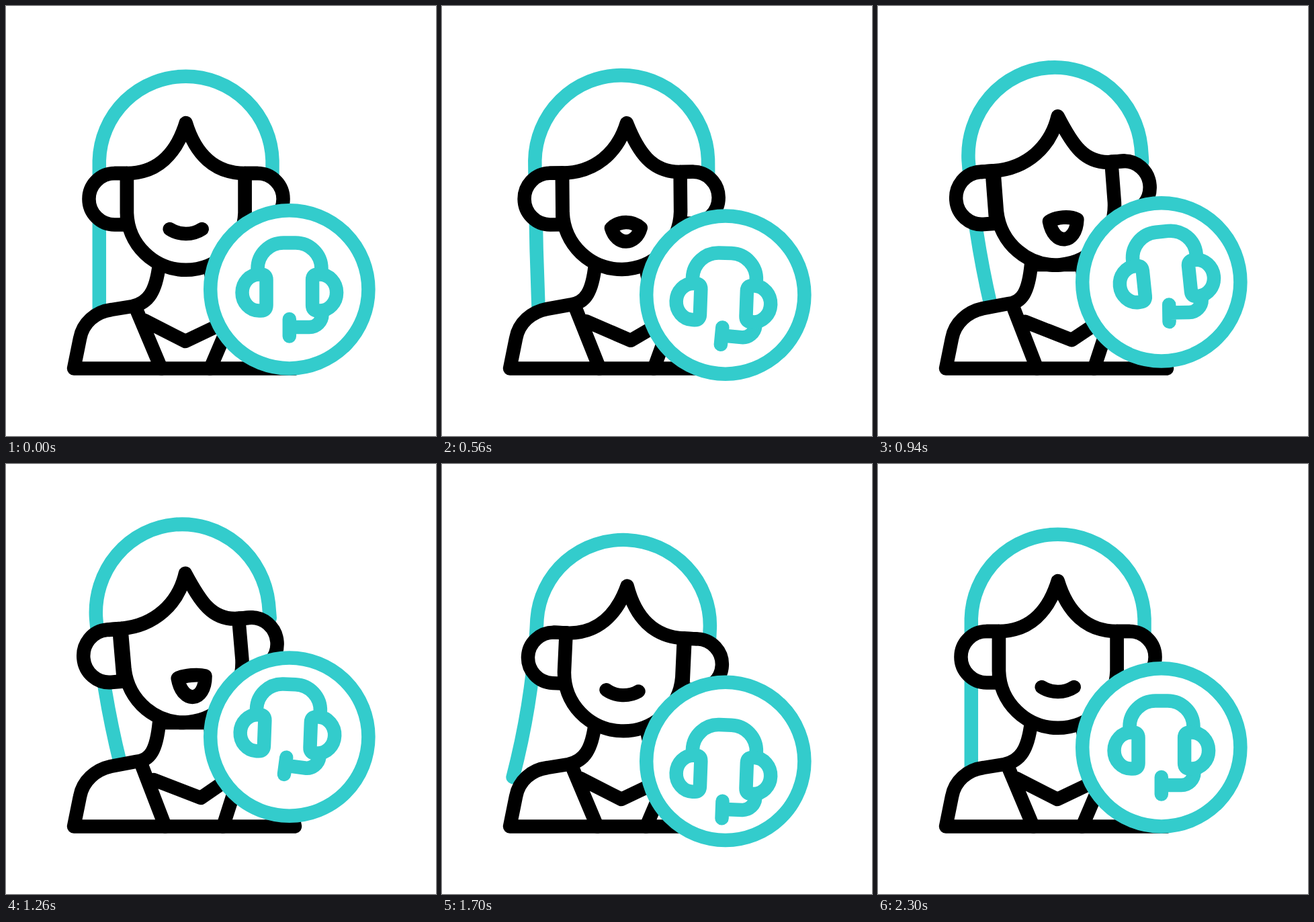
Recreate the animation shown at these times as an HTML page. Size 640 px wide and 640 px high, loop 2720 ms.

```html
<!DOCTYPE html>
<html lang="en">
<head>
<meta charset="utf-8">
<title>Support agent</title>
<style>
html, body { margin: 0; height: 100%; overflow: hidden; background: #fff }
svg { display: block; width: 100vw; height: 100vh }
g { stroke-width: 20.5; stroke-linecap: round; stroke-linejoin: round; fill: none; stroke: #000 }
.teal { stroke: #3cc }
.solid { fill: #fff }
</style>
</head>
<body>
<svg viewBox="0 0 640 640">
  <g id="hairTurn" class="teal"><path id="hair"/></g>
  <g>
    <path id="body" class="solid"/>
    <path id="shirt"/>
  </g>
  <g id="ears">
    <path class="solid" d="M180 325.5H161.7a38.2 38.2 0 0 1 0-76.5H180zM355.5 325.5h18.8a38.2 38.2 0 0 0 0-76.5H355.5z"/>
  </g>
  <g id="face">
    <path class="solid" d="M180 249V308a87.8 87.8 0 0 0 175.5 0V249"/>
    <path id="bangs" class="solid"/>
    <path id="mouth"/>
  </g>
  <g id="badge" class="teal"><circle class="solid" cx="421.8" cy="421.8" r="117.6"/></g>
  <g id="headset" class="teal">
    <path d="M374.5 397v-6a38.5 38.5 0 0 1 38.5-38.5h18a38.5 38.5 0 0 1 38.5 38.5v6"/>
    <path id="mic" d="M470.5 459a19 19 0 0 1-19 19H421.8M421.8 466v25.5"/>
    <path id="cup" class="solid" d="M376.5 399.5a25 27 0 0 0 0 54h3q8 0 8-8v-38q0-8-8-8z"/>
    <use href="#cup" transform="matrix(-1 0 0 1 843.6 0)"/>
  </g>
</svg>
<script>
const LOOP = 2720, STEP = 20;
const START = 200, DIP = 400, PEAK = 1270, DIP2 = 1650, REBOUND = 1930, END = 2300;

const set = (id, name, value) => document.getElementById(id).setAttribute(name, value);
const part = (t, from, to) => Math.min(1, Math.max(0, (t - from) / (to - from)));
const smooth = u => (1 - Math.cos(Math.PI * u)) / 2;
const easeOut = (u, power) => 1 - (1 - u) ** power;

// From rest: dip, glide to the peak, dip again, rebound, settle.
function swing(t, dip, peak, rebound, power) {
  return dip * smooth(part(t, START, DIP))
    + (peak - dip) * easeOut(part(t, DIP, PEAK), power)
    + (dip - peak) * smooth(part(t, PEAK, DIP2))
    + (rebound - dip) * smooth(part(t, DIP2, REBOUND) ** 1.5)
    - rebound * smooth(part(t, REBOUND, END));
}

function draw(t) {
  const lift = swing(t, -.55, 1, .35, 2.7);
  const turn = easeOut(part(t, START, PEAK), 2.25) - smooth(part(t, PEAK, DIP2));
  const sway = 6 * Math.cos(2 * Math.PI * (t - 340) / 1140)
    * smooth(part(t, START, 360)) * (1 - smooth(part(t, 1700, 1920)));

  // Parts of the head share one tilt; a higher pivot makes a part lag behind.
  const pose = pivot => `translate(0 ${-8 * lift}) rotate(${-4.9 * lift} 267.7 ${pivot})`
    + `translate(0 406) scale(1 ${1 + .024 * lift}) translate(0 -406)`;
  set('hairTurn', 'transform', pose(287));
  set('face', 'transform', pose(350));
  set('ears', 'transform', pose(385));

  const tail = 138.8 + 38 * lift - 16 * lift * lift;
  set('hair', 'd', `M${tail} 470Q138.8 350 138.8 230a128.9 128.9 0 0 1 257.7 0v22`);

  const tip = 267.7 + 14.5 * turn;
  set('bangs', 'd', `M161.7 249H180C${225 + 5 * turn} 249 ${tip - 14} 220 ${tip} ${174 + 3 * turn}`
    + `C${tip + 14 + 5 * turn} 220 ${310 + 6 * turn} 249 355.5 249h19`);

  const x = 267.7 + 10.5 * turn, y = 332 + 4 * turn * (1 - 2 * turn);
  const half = 24 - 3.5 * turn, bend = 10 + 7 * turn;
  const low = y + 9.3 + 29 * turn, top = y + 9.3 - 66 * turn + 53 * turn * turn;
  set('mouth', 'd', `M${x - half} ${y}C${x - bend} ${low} ${x + bend} ${low} ${x + half} ${y}`
    + `C${x + 10} ${top} ${x - 10} ${top} ${x - half} ${y}z`);

  set('body', 'd', `M101 539.5L110 495C114 472 133 455 ${157 - turn} ${452 - 2 * turn}`
    + `L${188 + 5 * turn} ${447 - 4 * turn}C${212 + 3 * turn} 442 ${223 + turn} 425 228 385`
    + `H303C308 425 319 442 343 447L374 452C398 455 417 472 421 495L430 539.5z`);
  set('shirt', 'd', `M${195 + 8 * turn} ${454 - 3 * turn}L${231 + 6 * turn} 539.5`
    + `M${340 + 10 * turn} 455L${304 + 19 * turn} 539.5`
    + `M${206 + 14 * turn} ${468 + 2 * turn}L${267 + 23 * turn} ${499 - 2 * turn}L332 468`);

  set('badge', 'transform', `translate(0 ${swing(t, 21, -15.7, -3.2, 2.1)})`);
  set('headset', 'transform',
    `translate(0 ${swing(t, 36.5, -24.6, -4.5, 2.1)}) rotate(${sway} 421.8 348)`);
  set('mic', 'transform', `rotate(${5.5 * turn} 470 460)`);
}

const begin = performance.now();
function tick() {
  const t = (performance.now() - begin) % LOOP;
  draw(Math.floor(t / STEP) * STEP);
  requestAnimationFrame(tick);
}
tick();
</script>
</body>
</html>
```
